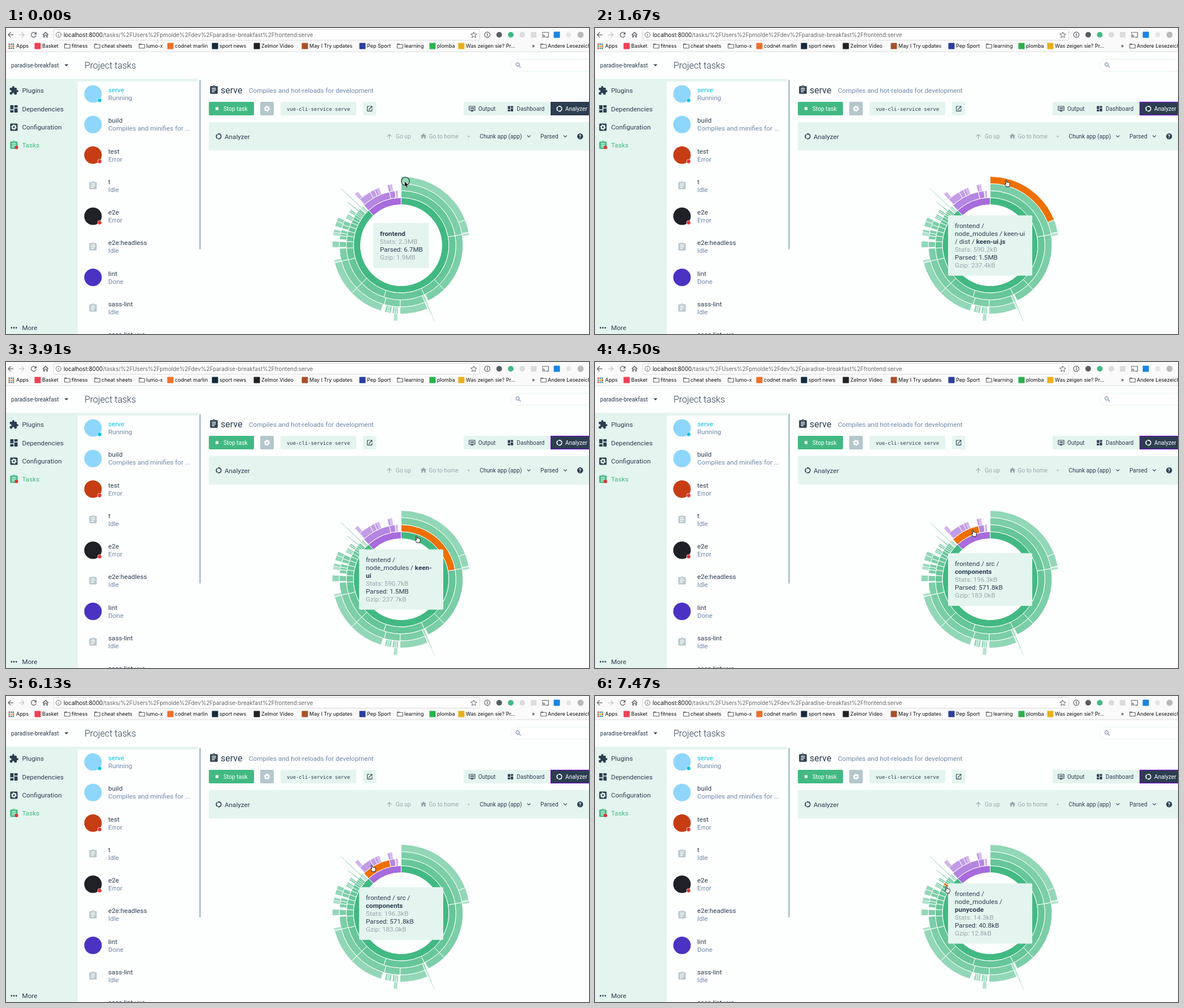
These frames come from a looping animation (1032x543 px, 8000 ms). An HTML page:

```html
<!DOCTYPE html>
<html lang="en">
<head>
<meta charset="utf-8">
<title>Project tasks</title>
<style>
html, body { margin: 0; width: 100%; height: 100%; overflow: hidden; background: #fdfefe; }
svg { display: block; font-family: Roboto, sans-serif; }
.chrome { font-family: Inter, sans-serif; }
.mono { font-family: "DejaVu Sans Mono", monospace; }
.b { font-weight: 700; }
.light { font-weight: 300; }
</style>
</head>
<body>
<svg id="stage" width="1032" height="543" viewBox="0 0 1032 543"></svg>
<script>
const DARK = '#2c3e50', GREEN = '#42b983', PALE = '#e4f5ef', SOFT = '#6f88aa',
  DIM = '#98a7ac', RED = '#e83030', CYAN = '#03c2e6', ORANGE = '#ed7000', GREY = '#5f6368';

const icons = {
  puzzle: 'M20.5 11H19V7c0-1.1-.9-2-2-2h-4V3.5C13 2.1 11.9 1 10.5 1S8 2.1 8 3.5V5H4c-1.1 0-2 .9-2 2v3.8h1.5c1.5 0 2.7 1.2 2.7 2.7s-1.2 2.7-2.7 2.7H2V20c0 1.1.9 2 2 2h3.8v-1.5c0-1.5 1.2-2.7 2.7-2.7s2.7 1.2 2.7 2.7V22H17c1.1 0 2-.9 2-2v-4h1.5a2.5 2.5 0 0 0 0-5z',
  board: 'M3 13h8V3H3v10zm0 8h8v-6H3v6zm10 0h8V11h-8v10zm0-18v6h8V3h-8z',
  clip: 'M19 3h-4.2a3 3 0 0 0-5.6 0H5c-1.1 0-2 .9-2 2v14c0 1.1.9 2 2 2h14c1.1 0 2-.9 2-2V5c0-1.1-.9-2-2-2zm-7 0a1 1 0 0 1 0 2 1 1 0 0 1 0-2zm2 14H7v-2h7v2zm3-4H7v-2h10v2zm0-4H7V7h10v2z',
  home: 'M10 20v-6h4v6h5v-8h3L12 3 2 12h3v8z',
  house: 'M10 20v-6h4v6h5v-8h3L12 3 2 12h3v8zM7 18v-7l5-4.5 5 4.5v7h-1v-6H8v6z',
  search: 'M15.5 14h-.8l-.3-.3a6.5 6.5 0 1 0-.7.7l.3.3v.8l5 5 1.5-1.5zm-6 0a4.5 4.5 0 1 1 0-9 4.5 4.5 0 0 1 0 9z',
  open: 'M19 19H5V5h7V3H5c-1.1 0-2 .9-2 2v14c0 1.1.9 2 2 2h14c1.1 0 2-.9 2-2v-7h-2v7zM14 3v2h3.6l-9.8 9.8 1.4 1.4L19 6.4V10h2V3h-7z',
  up: 'M4 12l1.4 1.4L11 7.8V20h2V7.8l5.6 5.6L20 12l-8-8z',
  more: 'M16.6 8.6L12 13.2 7.4 8.6 6 10l6 6 6-6z',
  drop: 'M6 9.5l6 6 6-6z',
  reload: 'M17.6 6.4A8 8 0 1 0 19.7 14h-2.1A6 6 0 1 1 16.2 7.8L13 11h7V4z',
  folder: 'M20 6h-8l-2-2H4c-1.1 0-2 .9-2 2v12c0 1.1.9 2 2 2h16c1.1 0 2-.9 2-2V8c0-1.1-.9-2-2-2zm0 12H4V8h16v10z',
  cast: 'M21 3H3c-1.1 0-2 .9-2 2v3h2V5h18v14h-7v2h7c1.1 0 2-.9 2-2V5c0-1.1-.9-2-2-2zM1 18v3h3a3 3 0 0 0-3-3zm0-4v2a5 5 0 0 1 5 5h2a7 7 0 0 0-7-7zm0-4v2a9 9 0 0 1 9 9h2A11 11 0 0 0 1 10z',
  screen: 'M21 3H3c-1.1 0-2 .9-2 2v12c0 1.1.9 2 2 2h5v2h8v-2h5c1.1 0 2-.9 2-2V5c0-1.1-.9-2-2-2zm0 14H3V5h18zM8 8h11v2H8zm0 4h11v2H8zM5 8h2v2H5zm0 4h2v2H5z'
};

// Drawing helpers; each returns SVG markup
const text = (x, y, s, size = 11.7, fill = DARK, cls = '') =>
  `<text x="${x}" y="${y}" font-size="${size}" fill="${fill}" class="${cls}">${s}</text>`;
const rect = (x, y, w, h, fill, r = 0, more = '') =>
  `<rect x="${x}" y="${y}" width="${w}" height="${h}" rx="${r}" fill="${fill}" ${more}/>`;
const button = (x, w, fill) => rect(x, 131, w, 24, fill, 2);
const dot = (x, y, r, fill, more = '') => `<circle cx="${x}" cy="${y}" r="${r}" fill="${fill}" ${more}/>`;
const icon = (name, x, y, size, fill = DARK, turn = 0) =>
  `<path d="${icons[name]}" fill="${fill}" fill-rule="evenodd" transform="translate(${x} ${y}) rotate(${turn}) scale(${size / 24}) translate(-12 -12)"/>`;
const ring = (x, y, r, w, color, dash = '') =>
  dot(x, y, r, 'none', `stroke="${color}" stroke-width="${w}" stroke-dasharray="${dash}"`);
const gear = (x, y, r, color) =>
  ring(x, y, r * .62, r * .5, color) + ring(x, y, r * .92, r * .3, color, `${r * .42} ${r * .543}`);
const donut = (x, y, color) => ring(x, y, 4.3, 1.8, color, '8 1');

function browser() {
  let s = rect(0, 0, 1032, 42, '#fafafa') + rect(84.5, 2.5, 754, 19, '#fff', 2, 'stroke="#dadada"') +
    rect(0, 41.5, 1032, 1, '#dcdcdc') +
    icon('up', 8, 12, 15, GREY, -90) + icon('up', 28, 12, 15, '#c4c6c8', 90) +
    icon('reload', 49, 12, 15, GREY) + icon('house', 70, 12, 14, GREY) +
    ring(93, 12, 4.5, 1, GREY) + rect(92.5, 11.5, 1, 3, GREY) + rect(92.5, 9.5, 1, 1, GREY) +
    text(102, 15.8, 'localhost:8000<tspan fill="#666">/tasks/%2FUsers%2Fpmolde%2Fdev%2Fparadise-breakfast%2Ffrontend:serve</tspan>', 9.8, '#111') +
    '<path d="M828 7l1.5 3.5 3.8.3-2.9 2.5.9 3.7-3.3-2-3.3 2 .9-3.7-2.9-2.5 3.8-.3z" fill="none" stroke="#5f6368"/>' +
    ring(852, 12, 4.8, 1.2, GREY) + rect(851.4, 9, 1.2, 6, GREY) +
    dot(873, 12, 5, '#5a5d61') + dot(893.5, 12, 5, GREEN) + dot(914, 12, 5, '#dcdcdc') +
    rect(929, 7, 10, 10, '#dcdcdc', 1) + icon('cast', 955, 12, 13, GREY) +
    rect(969.5, 6.5, 11, 11, '#1a86e0', 1) + dot(996, 12, 4.5, '#e6e6e6') + dot(1017, 12, 5.5, '#b9b9b9');
  const hues = ['#e0483e', '#f0b400', '#3b9c55', '#4380ea'];
  for (let i = 0; i < 9; i++)
    s += rect(4.5 + i % 3 * 3.6, 27.5 + (i / 3 | 0) * 3.6, 2.6, 2.6, hues[(i * 3 + (i / 3 | 0)) % 4]);
  const marks = [['', 18, 'Apps'], ['#ee4056', 64, 'Basket'], ['/', 116, 'fitness'], ['/', 169, 'cheat sheets'],
    ['/', 248, 'lumo-x'], ['#f0702a', 299, 'codnet marlin'], ['#152a3c', 378, 'sport news'],
    ['#222', 452, 'Zelmor Video'], ['#a8512a', 537, 'May I Try updates'], ['#2b3f9c', 639, 'Pep Sport'],
    ['/', 705, 'learning'], ['#2bb24c', 763, 'plomba'], ['#e8b11c', 814, 'Was zeigen sie? Pr...'],
    ['', 931, '»'], ['/', 959, 'Andere Lesezeichen']];
  for (const [mark, x, label] of marks) {
    if (mark === '/') s += icon('folder', x - 7.5, 32, 13, GREY);
    else if (mark) s += rect(x - 13.5, 26.5, 11, 11, mark, 1);
    s += text(x, 35.3, label, 9, '#111');
  }
  return `<g class="chrome">${s}</g>`;
}

function sidebar() {
  let s = rect(0, 90, 127, 453, PALE) + rect(127, 90, 213, 5, PALE) +
    text(9, 70, 'paradise-breakfast', 10.2) + icon('drop', 107, 66, 14) +
    text(139, 72, 'Project tasks', 16, DARK, 'light') +
    icon('puzzle', 14, 111, 17.5) + icon('board', 14, 143.5, 17.5) +
    rect(7.5, 169.5, 13, 13, DARK, 1.5) + gear(14, 176, 4.6, PALE) +
    icon('clip', 14, 208, 17.5, GREEN) + dot(18.5, 212, 3, RED);
  ['Plugins', 'Dependencies', 'Configuration', 'Tasks'].forEach((label, i) =>
    s += text(28.5, 115.2 + i * 32.3, label, 11.7, i === 3 ? GREEN : DARK));
  for (let i = 0; i < 3; i++) s += dot(9.8 + i * 4.2, 532, 1.4, DARK);
  s += text(28.5, 536, 'More');

  const tasks = [['serve', 'Running', '#8ed6fb', CYAN], ['build', 'Compiles and minifies for ...', '#8ed6fb'],
    ['test', 'Error', '#c63d14', RED], ['t', 'Idle'], ['e2e', 'Error', '#1f2126', RED], ['e2e:headless', 'Idle'],
    ['lint', 'Done', '#4b32c3'], ['sass-lint', 'Idle'], ['sass-lint-vue', 'Idle']];
  tasks.forEach(([name, state, logo, badge], i) => {
    const y = i * 54.25;
    s += logo ? dot(154, 117 + y, 15.5, logo) : icon('clip', 154, 117 + y, 17.5, '#b9c8cd');
    if (badge) s += dot(165.7, 128.3 + y, 3.6, badge, 'stroke="#fff" stroke-width=".7"');
    s += text(181, 114 + y, name, 11.7, i ? DARK : CYAN) + text(181, 128 + y, state, 11.7, SOFT);
  });
  return s + rect(342, 92, 3, 301, '#b3c7cd', 1);
}

function toolbar() {
  return rect(893.5, 55.5, 160, 21, '#fff', 10.5, `stroke="${PALE}"`) + icon('search', 907, 66, 13, SOFT) +
    icon('clip', 368, 110, 18) + text(380, 115.5, 'serve', 16) +
    text(430, 114.5, 'Compiles and hot-reloads for development', 11.7, SOFT) +
    button(359, 80, GREEN) + rect(371, 140.5, 5, 5, '#fff') + text(385, 147, 'Stop task', 10.2, '#fff') +
    button(450, 24, '#b3c7cd') + gear(462, 143.2, 5, '#fff') +
    button(486, 134, PALE) + text(497, 146.8, 'vue-cli-service serve', 8.87, DARK, 'mono') +
    button(632, 23.5, PALE) + icon('open', 643.7, 143.2, 12.5) +
    button(810, 160, PALE) + icon('screen', 825, 143.2, 12.5) + text(836, 147, 'Output', 10.2) +
    icon('board', 893, 143.2, 12.5) + text(904, 147, 'Dashboard', 10.2) +
    rect(964, 131, 80, 24, DARK) +
    rect(964.5, 131.5, 80, 23, 'none', 0, 'id="focus" stroke="#6806c1" stroke-width="1.2"') +
    donut(979.5, 143.2, '#fff') + text(990, 147, 'Analyzer', 10.2, '#fff') +
    rect(359, 167, 690, 50.5, PALE, 3) + donut(376.5, 192.3, DARK) + text(387, 196.5, 'Analyzer') +
    icon('up', 678.5, 192.3, 13, DIM) + text(690, 196, 'Go up', 10.2, DIM) +
    icon('home', 739, 192, 13, DIM) + text(748.5, 196, 'Go to home', 10.2, DIM) + dot(819, 192.3, 1.6, '#b3c7cd') +
    text(838.5, 196, 'Chunk app (app)', 10.2) + icon('more', 925.5, 192, 13) +
    text(946, 196, 'Parsed', 10.2) + icon('more', 990, 192, 13) +
    dot(1016.3, 192.3, 5.2, DARK) + text(1014, 195.5, '?', 8.5, '#fff', 'b');
}

// Sunburst: each string is a run of touching arcs, in degrees clockwise from the top
const CX = 699.5, CY = 385.5, HOLE = 72, BAND = 12.5;
const greens = [GREEN, '#66c699', '#7bcea7', '#92d7b7', '#92d7b7', '#a0dcc1'];
const purples = ['#a76bdc', '#b485e1', '#c29ce6'];
const greenArcs = [
  ['0 317'],
  ['0 80 136 155 198.5 226 254.5 267 274 280 285 290 294.5 298 301.5 304 306 308 309.8 311.2', '312.9 313.6', '314.4 315.3'],
  ['0 80 136 154', '155.5 156.4 157.2', '157.5 181 196 226 255 267', '268 273.5', '275.5 279 281.5 284.5',
    '286 289.5 293.5', '296 297.5 299 300.5', '302.5 304 305.5', '308.6 309.4', '313 313.6'],
  ['0 68.3 79', '79.6 80.5 81.4', '155.7 156.3 156.9', '157.5 181', '182.5 184 185.5 187.5', '188.5 190.5 192 194',
    '197 226 255', '255.5 256.4 257.3', '268 273.5', '278.5 279.7 281 283.5', '286 290.5 294', '308.6 309.2', '313 313.6'],
  ['156 156.6', '183 183.9 184.8 185.7', '313.1 313.6'],
  ['156.2 156.6', '313.2 313.6']
];
const purpleArcs = [
  ['317 360'],
  ['317 347.5 353.5', '354.3 355.3 356.3'],
  ['318 329.7 334.2 336.9 338 339', '347 349.5 350.5 351.5'],
  ['318 319 320 321']
];

function arcs(runs, colors, tag) {
  const point = (r, a) => {
    const t = a * Math.PI / 180;
    return (CX + r * Math.sin(t)).toFixed(2) + ' ' + (CY - r * Math.cos(t)).toFixed(2);
  };
  let s = '';
  runs.forEach((list, level) => list.forEach(run => {
    const cuts = run.split(' ').map(Number), r = HOLE + level * BAND, R = r + BAND;
    for (let i = 0; i < cuts.length - 1; i++) {
      const a = cuts[i], b = cuts[i + 1], big = +(b - a > 180);
      s += `<path id="${tag}${level + 1}_${a}" fill="${colors[Math.min(level, colors.length - 1)]}" stroke="#fff" stroke-width="${b - a < 1.5 ? .4 : 1}"
        d="M${point(R, a)}A${R} ${R} 0 ${big} 1 ${point(R, b)}L${point(r, b)}A${r} ${r} 0 ${big} 0 ${point(r, a)}z"/>`;
    }
  }));
  return s;
}

// name: [arc id, path lines with * before bold text, stats, parsed, gzip]
const nodes = {
  root: ['', '*frontend', '2.3MB', '6.7MB', '1.9MB'],
  file: ['g4_0', 'frontend /|node_modules / keen-ui|/ dist / *keen-ui.js', '590.2kB', '1.5MB', '237.4kB'],
  dist: ['g3_0', 'frontend /|node_modules / keen-ui|/ *dist', '590.7kB', '1.5MB', '237.7kB'],
  keen: ['g2_0', 'frontend /|node_modules / *keen-|*ui', '590.7kB', '1.5MB', '237.7kB'],
  mods: ['g1_0', 'frontend /|*node_modules', '2.0MB', '5.9MB', '1.6MB'],
  src: ['p1_317', 'frontend / *src', '274.6kB', '803.1kB', '251.4kB'],
  comps: ['p2_317', 'frontend / src /|*components', '196.3kB', '571.8kB', '183.0kB'],
  header: ['p3_334.2', 'frontend / src /|components / *header-|*section', '9.7kB', '50.7kB', '19.0kB'],
  babel: ['g2_314.4', 'frontend /|node_modules /|*@babel', '4.0kB', '22.1kB', '12.2kB'],
  puny: ['g2_301.5', 'frontend /|node_modules /|*punycode', '14.3kB', '40.8kB', '12.8kB']
};

function tooltip([, path, stats, parsed, gzip]) {
  const lines = path.split('|').map(l => l.replace(/\*(.+)/, '<tspan class="b">$1</tspan>'));
  const n = lines.length + 3, h = 25 + 13.7 * n, w = n === 4 ? 99 : 149, left = CX - w / 2, mid = 386;
  const rows = [...lines, 'Stats: ' + stats, 'Parsed: ' + parsed, 'Gzip: ' + gzip];
  return rect(left, mid - h / 2, w, h, PALE, 2) + rows.map((row, i) =>
    text(left + 12, (mid + 11 + 13.9 * (i - n / 2)).toFixed(1), row, 11.7, /^(Stats|Gzip)/.test(row) ? DIM : DARK)).join('');
}

// Pointer steps: time, x, y, hovered node
const steps = [
  [0, 707, 272, 'root'], [150, 713, 272, 'root'], [330, 721, 272, 'root'], [480, 727, 272, 'root'],
  [930, 728, 272, 'root'], [1230, 729, 273, 'root'],
  [1530, 730, 276, 'file'], [1680, 730, 279, 'file'], [1820, 730, 281, 'file'],
  [2120, 730, 285, 'file'], [2270, 730, 290, 'dist'], [2420, 730, 295, 'dist'], [2570, 730, 298, 'dist'],
  [3620, 730, 303, 'dist'], [3770, 730, 309, 'keen'], [3910, 729, 315, 'keen'], [4060, 724, 318, 'mods'],
  [4210, 710, 317, 'mods'], [4350, 690, 311, 'src'], [4500, 671, 304, 'comps'], [4650, 660, 300, 'comps'],
  [4790, 656, 298, 'header'], [4940, 654, 298, 'header'], [5390, 655, 300, 'header'],
  [6130, 650, 306, 'comps'], [6280, 646, 317, 'src'], [6430, 642, 327, 'mods'], [6580, 639, 334, 'babel'],
  [6730, 638, 335, 'babel'], [7030, 634, 337, 'mods'], [7180, 631, 339, 'mods'], [7330, 627, 342, 'mods'],
  [7470, 624, 344, 'puny']
];
const HAND = '<path d="M-3.5-5.5c.6-1 2-.6 2.1.5l.3 3c.5-.6 1.5-.5 1.8.2.6-.5 1.5-.3 1.8.4.8-.4 1.8 0 1.8 1v2c0 1.7-1 2.2-1 4.2h-5c-.5-1.8-2.3-3-2.9-4.5-.3-.9.8-1.4 1.5-.7l.6.5z" fill="#fff" stroke="#111"/>';
const ARROW = '<path d="M-1.5 0v10l2.3-2.1 1.7 3.9 1.8-.8-1.7-3.8h3.2z" fill="#000" stroke="#fff" stroke-width=".6"/>';

const stage = document.getElementById('stage');
stage.innerHTML = browser() + sidebar() + toolbar() + arcs(greenArcs, greens, 'g') + arcs(purpleArcs, purples, 'p') +
  '<g id="tip"></g><g id="pointer"></g>';
const [focusBox, tip, pointer] = ['focus', 'tip', 'pointer'].map(id => document.getElementById(id));
let shown, lit, litFill;

function draw(step) {
  const [t, x, y, name] = step, node = nodes[name];
  if (lit) lit.setAttribute('fill', litFill);
  lit = document.getElementById(node[0]);
  if (lit) {
    litFill = lit.getAttribute('fill');
    lit.setAttribute('fill', ORANGE);
  }
  tip.innerHTML = tooltip(node);
  focusBox.style.display = t < 930 ? 'none' : '';
  pointer.setAttribute('transform', `translate(${x} ${y})`);
  pointer.innerHTML = t < 1530 ? (t < 1230 ? ring(0, 0, 7.3, 1.1, '#222') : '') + ARROW : HAND;
}

function tick() {
  const t = performance.now() % 8000;
  const step = steps.filter(s => s[0] <= t).pop();
  if (step !== shown) draw(shown = step);
  requestAnimationFrame(tick);
}
tick();
</script>
</body>
</html>
```
